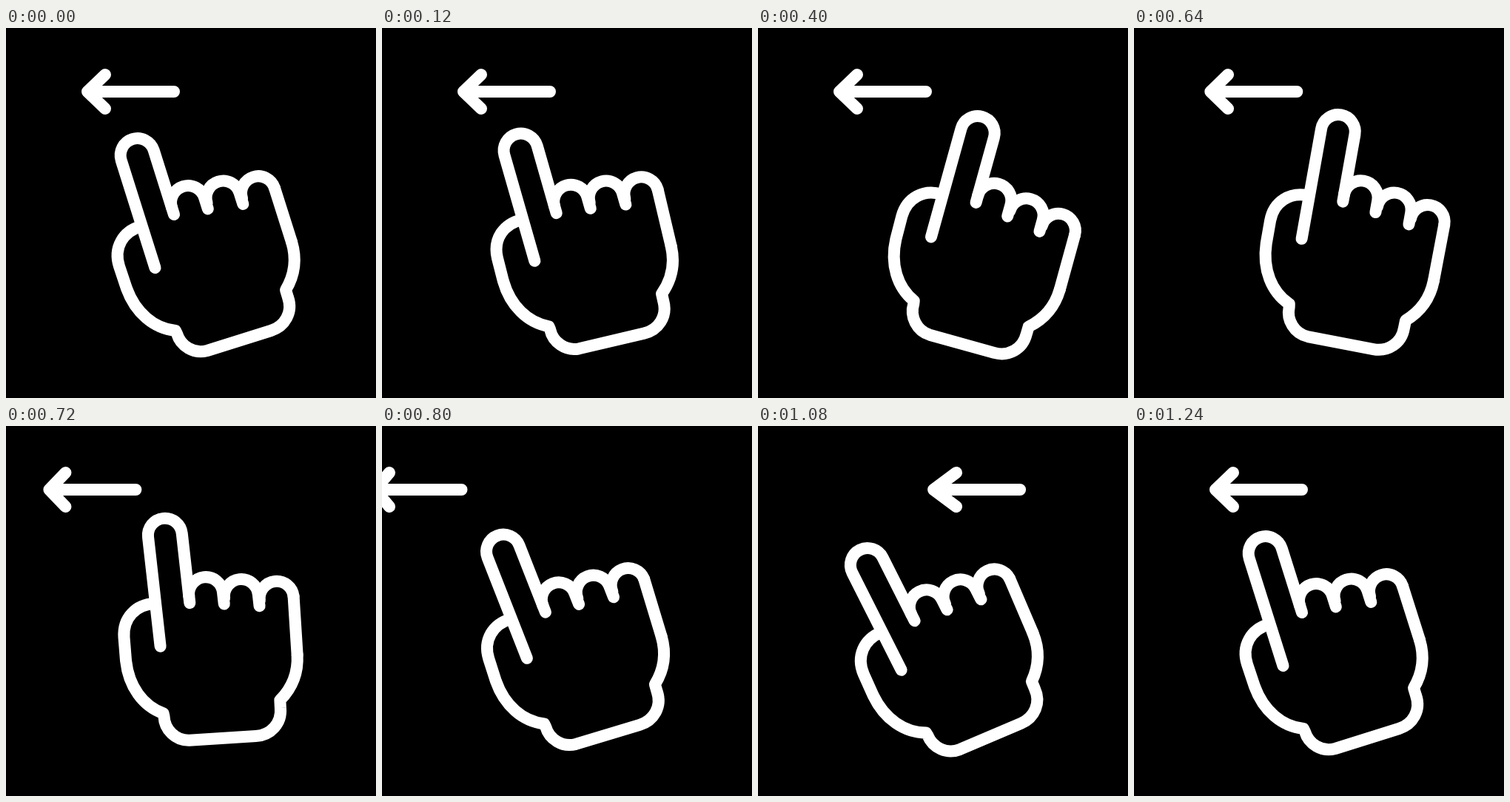
An HTML page that plays this animation: 500x500 px, repeating every 1.48 s.

```html
<!DOCTYPE html>
<html lang="en">
<head>
<meta charset="utf-8">
<title>Swipe left</title>
<style>
  html, body { margin: 0; width: 100%; height: 100%; overflow: hidden; background: #000; }
  svg { display: block; width: 100vw; height: 100vh; }
  path { fill: none; stroke: #fff; stroke-width: 16; stroke-linecap: round; stroke-linejoin: round; }
</style>
</head>
<body>
<svg viewBox="0 0 500 500">
  <g id="fingers">
    <path id="pointer"/>
    <path id="folded"/>
  </g>
  <path id="side"/>
  <path id="palm" d="M386 289C393 312 390 334 378 354L381 364C388 384 377 403 358 409
    L272 436C254 441 236 430 231 413L229 409C200 406 175 385 163 352
    L153 322C145 297 158 275 182 268"/>
  <path id="arrowOut"/>
  <path id="arrowIn"/>
</svg>
<script>
const LOOP = 1480, STEP = 40;
const PIVOT = { x: 288, y: 358 };    // the hand swings around this point
const KNUCKLE = { x: 227, y: 252 };  // origin of the finger group
const SIDE = { x: 386, y: 289 };     // where the palm edge begins
const TILT = -17.5;                  // resting lean of the fingers
const WIDTH = 46, GAP = 47.2, DROP = 8.15;

const $ = id => document.getElementById(id);
const set = (id, name, value) => $(id).setAttribute(name, value);
const clamp = x => Math.min(1, Math.max(0, x));
const ease = x => { x = clamp(x); return x * x * (3 - 2 * x); };

function rotate(x, y, deg) {
  const r = deg * Math.PI / 180, c = Math.cos(r), s = Math.sin(r);
  return { x: x * c - y * s, y: x * s + y * c };
}

const arc = (x, y) => `A23 23 0 0 1 ${x} ${y}`;

// Three folded fingers, each a half circle with a short stub after the first two.
function foldedPath() {
  let d = '';
  for (let i = 0; i < 3; i++) {
    const x = i * GAP, y = -9.5 + i * DROP;
    d += `M${x} ${y}${arc(x + WIDTH, y)}`;
    if (i < 2) d += 'v16';
  }
  return d;
}

function pose(t) {
  const right = ease((t - 40) / 360);
  const p = clamp((t - 600) / 360);
  const left = 1 - (1 - p ** 1.4) ** 2.5;
  const back = ease((t - 960) / 280);
  const bump = 4 * right * (1 - right);
  return {
    angle: 33 * right - 42.3 * left + 9.3 * back,
    bend: bump + left * (1 - back),
    dx: -12 * Math.sin(p * Math.PI / 2) * (1 - back),
    dy: -3 * bump - 6 * Math.sin(p * Math.PI)
  };
}

function drawHand(t) {
  const { angle, bend, dx, dy } = pose(t);
  const place = (x, y) => {
    const v = rotate(x - PIVOT.x, y - PIVOT.y, angle);
    return { x: PIVOT.x + dx + v.x, y: PIVOT.y + dy + v.y };
  };

  // The fingers sink into the palm and lean ahead of it while the hand bends.
  const sink = rotate(0, 8.5 * bend, TILT);
  const base = place(KNUCKLE.x + sink.x, KNUCKLE.y + sink.y);
  const lean = angle + TILT - 6 * bend;
  const tip = -91 - 8 * bend, root = 61 - 16 * bend;

  set('fingers', 'transform', `translate(${base.x} ${base.y}) rotate(${lean})`);
  set('pointer', 'd', `M${-WIDTH} ${root}V${tip}${arc(0, tip)}V0`);
  set('palm', 'transform', `translate(${dx} ${dy}) rotate(${angle} ${PIVOT.x} ${PIVOT.y})`);

  const edge = rotate(2 * GAP + WIDTH, -9.5 + 2 * DROP, lean);
  const end = place(SIDE.x, SIDE.y);
  set('side', 'd', `M${base.x + edge.x} ${base.y + edge.y}L${end.x} ${end.y}`);
}

function drawArrow(id, shift, head) {
  const tip = 110 + shift, wing = tip + head;
  set(id, 'd', `M${227 + shift} 86H${tip}M${wing} 63L${tip} 86L${wing} 109`);
}

function draw(t) {
  const out = ease((t - 600) / 400);
  const away = 1 - ease((t - 800) / 440);
  drawHand(t);
  drawArrow('arrowOut', -239 * out, 24 - 9 * out);
  drawArrow('arrowIn', 423 * away, 24 + 23 * away);
}

set('folded', 'd', foldedPath());
const start = performance.now();
function tick() {
  const t = (performance.now() - start) % LOOP;
  draw(Math.floor(t / STEP) * STEP);
  requestAnimationFrame(tick);
}
tick();
</script>
</body>
</html>
```
